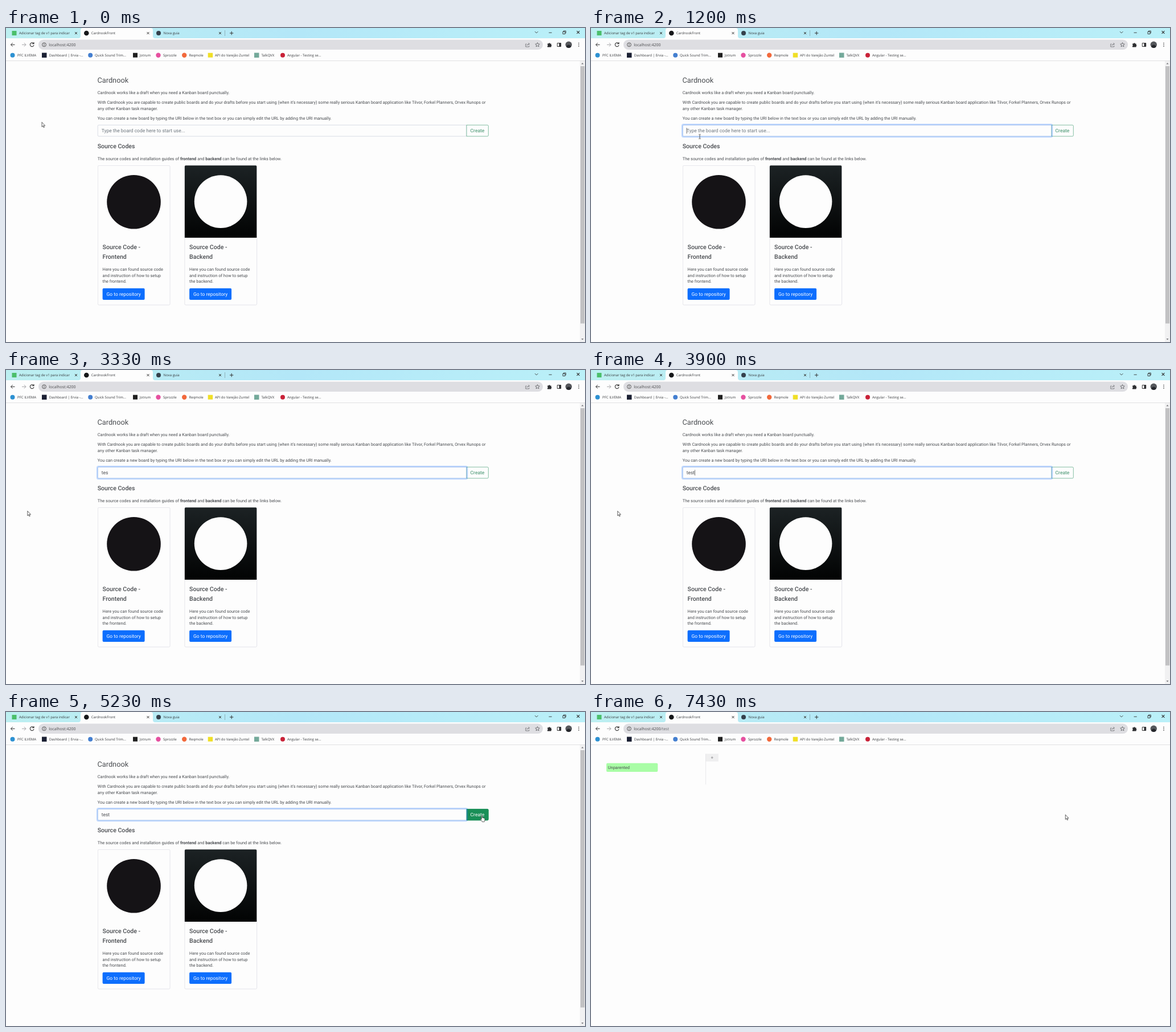
These frames come from a looping animation (1017 px wide and 551 px high, 7.46 s). An HTML page:

```html
<!DOCTYPE html>
<html lang="en">
<head>
<meta charset="utf-8">
<title>Cardnook</title>
<style>
  html, body { margin: 0; width: 100%; height: 100%; overflow: hidden; background: #fdfdfd; }
  svg { display: block; width: 100%; height: 100%; }
  text { font: 7.416px Roboto, sans-serif; fill: #494c50; text-rendering: geometricPrecision; white-space: pre; }
  .ui text { font: 6.05px "Open Sans", sans-serif; fill: #37393c; }
  .ui .url { font-size: 7px; fill: #46474a; }
  .url tspan { fill: #68696e; }
  .title { font-size: 12.71px; }
  .heading { font-size: 10.59px; font-weight: 500; }
  .field { font-size: 8.475px; }
  .hint { fill: #6c757d; }
  .button { font-size: 8.475px; fill: #fff; }
  .line { fill: none; stroke: #333; stroke-width: 1; }
  .border { fill: #fdfdfd; stroke-width: .53; }
  .strong { font-weight: 700; }

  /* One shared 7.46 s clock */
  .step { animation: 7.46s step-end infinite; }
  .move { animation: path 7.46s linear infinite; }
  .focus { animation: focus 7.46s linear infinite; }
  .hover { animation: hover 7.46s linear infinite; }
  .home { animation-name: home; }
  .board { animation-name: board; }
  .route { animation-name: route; }
  .hint { animation-name: hint; }
  .caret { animation-name: caret; }
  .arrow { animation-name: arrow; }
  .beam { animation-name: beam; }
  .hand { animation-name: hand; }
  .k1 { animation-name: key1; }
  .k2 { animation-name: key2; }
  .k3 { animation-name: key3; }
  .k4 { animation-name: key4; }

  @keyframes home { 0% { opacity: 1 } 87.1%, 100% { opacity: 0 } }
  @keyframes board { 0% { opacity: 0 } 87.1%, 100% { opacity: 1 } }
  @keyframes route { 0% { fill-opacity: 0 } 87.1%, 100% { fill-opacity: 1 } }
  @keyframes focus { 0%, 14% { opacity: 0 } 15.7%, 81.1% { opacity: 1 } 83.1%, 100% { opacity: 0 } }
  @keyframes hover { 0%, 64.6% { opacity: 0 } 66.6%, 100% { opacity: 1 } }
  @keyframes hint { 0% { opacity: 1 } 31.5%, 100% { opacity: 0 } }
  @keyframes key1 { 0% { fill-opacity: 0 } 31.5%, 100% { fill-opacity: 1 } }
  @keyframes key2 { 0% { fill-opacity: 0 } 33.8%, 100% { fill-opacity: 1 } }
  @keyframes key3 { 0% { fill-opacity: 0 } 36.9%, 100% { fill-opacity: 1 } }
  @keyframes key4 { 0% { fill-opacity: 0 } 45.6%, 100% { fill-opacity: 1 } }
  @keyframes caret {
    0%, 21.7% { opacity: 0; transform: none }
    14.6%, 28.8% { opacity: 1; transform: none }
    31.5% { opacity: 1; transform: translateX(2.8px) }
    33.8% { opacity: 1; transform: translateX(7.3px) }
    36.9% { opacity: 1; transform: translateX(11.6px) }
    44% { opacity: 0; transform: translateX(11.6px) }
    45.6%, 59.8%, 74% { opacity: 1; transform: translateX(14.4px) }
    52.7%, 66.9%, 81.1%, 100% { opacity: 0; transform: translateX(14.4px) }
  }
  @keyframes path {
    0%, 4.7% { transform: translate(62.5px, 164.8px); animation-timing-function: ease-in-out }
    13.4%, 18.8% { transform: translate(191px, 190.5px); animation-timing-function: ease-in-out }
    24.8%, 51.6% { transform: translate(37.3px, 247px); animation-timing-function: ease-in }
    59.4% { transform: translate(696.8px, 255.5px); animation-timing-function: ease-out }
    65.7%, 100% { transform: translate(832.8px, 179.8px) }
  }
  @keyframes arrow {
    0%, 19%, 87.1%, 100% { opacity: 1 }
    11.4%, 64.6% { opacity: 0 }
  }
  @keyframes beam { 0%, 19%, 100% { opacity: 0 } 11.4% { opacity: 1 } }
  @keyframes hand { 0%, 87.1%, 100% { opacity: 0 } 64.6% { opacity: 1 } }
</style>
</head>
<body>
<svg viewBox="0 0 1017 551" preserveAspectRatio="none">
  <defs>
    <linearGradient id="strip">
      <stop stop-color="#bdeff1"/><stop offset=".5" stop-color="#b3e7f8"/><stop offset="1" stop-color="#baf0f8"/>
    </linearGradient>
    <linearGradient id="dark" x2="0" y2="1">
      <stop stop-color="#1c2224"/><stop offset="1" stop-color="#020303"/>
    </linearGradient>
    <clipPath id="tabClip"><path d="M22 0h90v18H22z"/></clipPath>
    <path id="close" d="M-2-2 2 2M2-2-2 2"/>
    <g id="card">
      <rect class="border" x=".4" y=".4" width="126.7" height="244.6" rx="2" stroke="#cfcfda"/>
      <text class="heading" x="8.6" y="147.4">Source Code -</text>
      <text x="8.6" y="185">Here you can found source code</text>
      <text x="8.6" y="195.6">and instruction of how to setup</text>
      <rect x="8.6" y="215.8" width="74" height="20.1" rx="2" fill="#0d6efd"/>
      <text class="button" x="15.6" y="228.7">Go to repository</text>
    </g>
  </defs>
  <path fill="#fdfdfd" d="M0 0h1017v551H0z"/>

  <g class="ui">
    <path fill="url(#strip)" d="M0 0h1017v18H0z"/>
    <path fill="#fdfdfd" d="M127 18q4 0 4-4V4q0-4 4-4h119q4 0 4 4v10q0 4 4 4z"/>
    <path fill="#4bbf6b" d="M10.5 5h8v8h-8z"/>
    <text x="23" y="11.1" clip-path="url(#tabClip)">Adicionar tag de v1 para indicar</text>
    <circle cx="141.3" cy="9" r="4.3" fill="#17181a"/>
    <text x="149.8" y="11.1">CardnookFront</text>
    <circle cx="268" cy="9" r="4" fill="#35414c"/>
    <text x="276.6" y="11.1">Nova guia</text>
    <g class="line">
      <use href="#close" x="123" y="9"/><use href="#close" x="249.5" y="9"/><use href="#close" x="376" y="9"/>
      <path stroke="#7d9ba3" stroke-width=".7" d="M384.5 4v10"/>
      <path d="M393 9h6.4M396.2 5.8v6.4"/>
      <path stroke-width=".9" d="m929 6.2 2.7 2.7 2.7-2.7M953.5 8.2h5.2M978 6.5h4v4h-4zM979.3 6.2v-1.2h4v4h-1"/>
      <use href="#close" transform="translate(1005 7.5) scale(1.2)"/>
    </g>

    <rect x="57" y="20.5" width="886" height="17.5" rx="8.75" fill="#dedee2"/>
    <g class="line">
      <path d="M15.5 29.3H8.5m3.2-3.2-3.2 3.2 3.2 3.2"/>
      <path stroke="#a5a5a8" d="M28 29.3h7m-3.2-3.2 3.2 3.2-3.2 3.2"/>
      <path stroke-width="1.1" d="M48.3 27a3.4 3.4 0 1 0 .7 3.2M49 25v2.8h-2.8"/>
      <circle cx="67" cy="29.3" r="3.4" stroke-width=".8"/>
      <path stroke-width=".9" d="M67 28.7v2.3M67 27.2v.8"/>
      <path stroke="#66676b" stroke-width=".8" d="M914.5 28h-1.7v5h6v-2M915 31q.3-3 4-3m-1.5-2 2 2-2 2"/>
      <path stroke="#55565a" stroke-width=".8" d="m933.5 25.5 1.1 2.5 2.7.2-2 1.8.6 2.7-2.4-1.4-2.4 1.4.6-2.7-2-1.8 2.7-.2z"/>
      <path d="M968.3 26.5h6.4v6h-6.4z"/>
    </g>
    <path fill="#2c2d30" d="M951 27.5h2a1.3 1.3 0 0 1 2.6 0h2v2a1.3 1.3 0 0 1 0 2.4v1.6h-6.6v-2a1.3 1.3 0 0 0 0-2.4zM971.5 26.5h3.2v6h-3.2z"/>
    <circle cx="988.3" cy="29.3" r="5.7" fill="#56585c"/>
    <path fill="#25272c" d="M984 33q1-3.5 4.3-3.5t4.3 3.5a5.7 5.7 0 0 1-8.6 0"/>
    <g fill="#333"><circle cx="1006" cy="26.5" r=".8"/><circle cx="1006" cy="29.3" r=".8"/><circle cx="1006" cy="32.1" r=".8"/></g>
    <text class="url" x="75.2" y="31.8">localhost:4200<tspan class="step route">/test</tspan></text>

    <circle cx="11.5" cy="47.7" r="4" fill="#2d91d2"/>
    <text x="20" y="49.9">PFC ILVEMA</text>
    <path fill="#1b2033" d="M63 43.5h8.5v8.5H63z"/>
    <text x="75.8" y="49.9">Dashboard | Ervia -...</text>
    <circle cx="148.2" cy="47.7" r="4" fill="#447fd0"/>
    <text x="156" y="49.9">Quick Sound Trim...</text>
    <path fill="#202020" d="M223 43.7h8v8h-8z"/>
    <text x="235" y="49.9">Jotrum</text>
    <circle cx="267.5" cy="47.7" r="4.2" fill="#e650a0"/>
    <text x="276" y="49.9">Sprozzle</text>
    <circle cx="313.2" cy="47.7" r="4.2" fill="#f2693c"/>
    <text x="321.5" y="49.9">Reqmole</text>
    <path fill="#f0df27" d="M354.7 43.7h8.5v8h-8.5z"/>
    <text x="367" y="49.9">API do Varejão Zuntel</text>
    <path fill="#74a99a" d="M436 43.5h8.5v8.5H436z"/>
    <text x="448.5" y="49.9">TalkQVX</text>
    <circle cx="486" cy="47.7" r="4" fill="#c92238"/>
    <text x="494" y="49.9">Angular - Testing se...</text>
    <path fill="#d7d7da" d="M0 57h1017v.8H0z"/>
  </g>

  <g class="step home">
    <path fill="#f1f1f2" d="M1008 58h9v493h-9z"/>
    <path fill="#c1c1c3" d="M1009 67h7.2v451.5h-7.2z"/>
    <path fill="#77777a" d="m1010.5 63.5 2-2.5 2 2.5zM1010.5 545l2 2.5 2-2.5z"/>

    <text class="title" x="160.6" y="96">Cardnook</text>
    <text x="160.8" y="116.1">Cardnook works like a draft when you need a Kanban board punctually.</text>
    <text x="160.8" y="133">With Cardnook you are capable to create public boards and do your drafts before you start using (when it's necessary) some really serious Kanban board application like Tilvor, Forkel Planners, Orvex Runops or</text>
    <text x="160.8" y="143.6">any other Kanban task manager.</text>
    <text x="160.8" y="160.5">You can create a new board by typing the URI below in the text box or you can simply edit the URL by adding the URI manually.</text>

    <path class="border" stroke="#b9bfd0" d="M809 170.3H163q-1.8 0-1.8 1.8v16.1q0 1.8 1.8 1.8h646z"/>
    <path class="border" stroke="#198754" d="M809 170.3h36.5q1.8 0 1.8 1.8v16.1q0 1.8-1.8 1.8H809z"/>
    <text class="field" x="815.6" y="183" style="fill:#3a8f68">Create</text>
    <g class="hover">
      <path fill="#198f57" d="M808.8 170h36.6q2.2 0 2.2 2.2v15.9q0 2.2-2.2 2.2h-36.6z"/>
      <text class="button" x="815.6" y="183">Create</text>
    </g>
    <g class="focus" fill="none">
      <rect x="160" y="169.1" width="650.2" height="22.1" rx="2.5" stroke="#0d6efd" stroke-opacity=".25" stroke-width="2.1"/>
      <rect x="161.2" y="170.3" width="647.8" height="19.7" rx="1.8" stroke="#86b7fe" stroke-width=".53"/>
    </g>
    <text class="field step hint" x="167.7" y="183">Type the board code here to start use...</text>
    <text class="field" x="167.7" y="183"><tspan class="step k1">t</tspan><tspan class="step k2">e</tspan><tspan class="step k3">s</tspan><tspan class="step k4">t</tspan></text>
    <path class="step caret" fill="#333" d="M167.7 175.2h.7v10h-.7z"/>

    <text class="heading" x="160.7" y="211">Source Codes</text>
    <text x="160.8" y="231.5">The source codes and installation guides of <tspan class="strong">frontend</tspan> and <tspan class="strong">backend</tspan> can be found at the links below.</text>

    <use href="#card" x="161" y="241"/>
    <circle cx="224.5" cy="305.3" r="47.3" fill="#151316"/>
    <text class="heading" x="169.6" y="405.4">Frontend</text>
    <text x="169.6" y="447.2">the frontend.</text>

    <use href="#card" x="313.5" y="241"/>
    <path fill="url(#dark)" d="M313.9 368V243q0-1.7 1.7-1.7h123q1.7 0 1.7 1.7v125z"/>
    <circle cx="377.1" cy="304.6" r="46.3" fill="#fdfdfd"/>
    <text class="heading" x="322.1" y="405.4">Backend</text>
    <text x="322.1" y="447.2">the backend.</text>
  </g>

  <g class="step board">
    <rect x="27" y="89.7" width="90.3" height="15.3" rx="2" fill="#a9fda6"/>
    <text x="29.8" y="100">Unparented</text>
    <path fill="#efeff0" d="M201.3 73.3h22.5v13.5h-22.5z"/>
    <path fill="#e4e4e8" d="M201.2 73.3h.8v54h-.8z"/>
    <path fill="none" stroke="#85858a" stroke-width=".8" d="M210.7 80h4M212.7 78v4"/>
  </g>

  <g class="move">
    <path class="step arrow" fill="#fff" stroke="#222" stroke-width=".75" stroke-linejoin="round" d="M.4.4v8.2l1.9-1.7 1.3 2.9 1.3-.6-1.3-2.8h2.5z"/>
    <path class="step beam" fill="none" stroke="#333" stroke-width=".8" d="M-1.8-3.8h1.3L0-3.3l.5-.5h1.3M0-3.3v6.6M-1.8 3.8h1.3L0 3.3l.5.5h1.3"/>
    <path class="step hand" fill="#fff" stroke="#222" stroke-width=".75" stroke-linejoin="round" d="M2.3 8V2.5q0-1 .8-1t.8 1v3.3q1.2-.7 1.5.3 1.2-.5 1.5.5 1.3-.4 1.3.8v2.3q0 1.3-.8 2.5v.6H3.5v-.6L.8 9.200q-.8-1 0-1.5.7-.3 1.5.9z"/>
  </g>
</svg>
</body>
</html>
```
